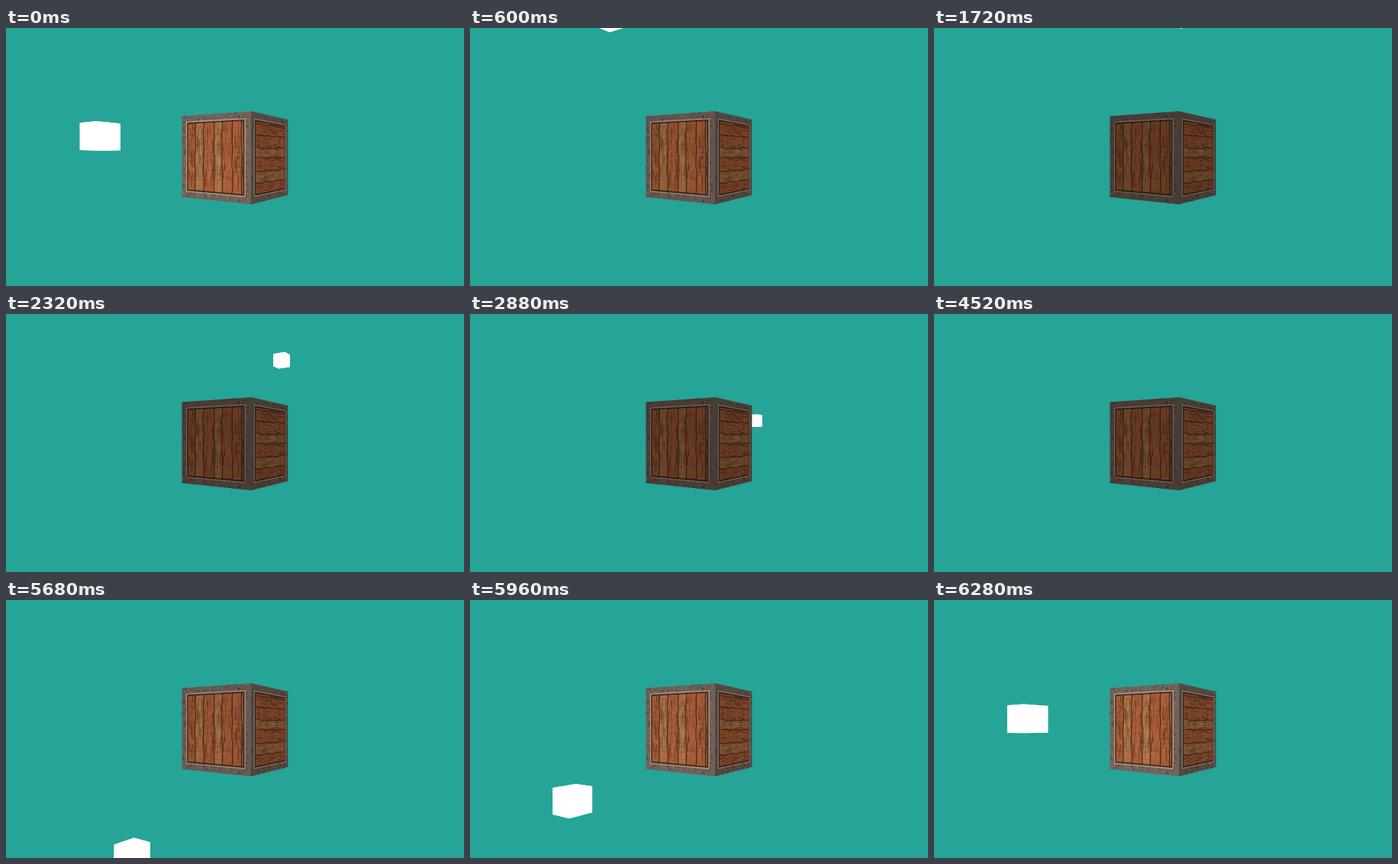
Write an HTML page with a canvas that moves like this. It is 600x338 px and loops after 6320 ms.

```html
<!DOCTYPE html>
<html lang="en">
<head>
<meta charset="utf-8">
<title>Lamp circling a crate</title>
<style>
  html, body { margin: 0; width: 100%; height: 100%; overflow: hidden; background: #26a498; }
  canvas { display: block; width: 600px; height: 338px; }
</style>
</head>
<body>
<canvas id="stage" width="600" height="338"></canvas>
<script>
const LOOP = 6320, STEP = 40, CX = 300, CY = 169;
const ctx = document.getElementById('stage').getContext('2d');

let seed = 7;
const rnd = () => (seed = (seed * 16807) % 2147483647) / 2147483647;
const range = (a, b) => a + (b - a) * rnd();
const mix = (a, b, k) => a + (b - a) * k;

function poly(c, points, color) {
  c.beginPath();
  points.forEach(p => c.lineTo(...p));
  c.closePath();
  c.fillStyle = color;
  c.fill();
}

// Perspective map of a unit square onto a wall with two upright edges [x, middle y, height].
const wall = (l, r) => (u, v) => {
  const zl = 1 / l[2], zr = 1 / r[2], z = mix(zl, zr, u);
  const x = mix(l[0] * zl, r[0] * zr, u) / z;
  return [x, mix(l[1], r[1], (x - l[0]) / (r[0] - l[0])) + (v - 0.5) / z];
};
const leftEdge = [230.5, 168.5, 106], nearEdge = [321, 170, 122], rightEdge = [369.3, 169.5, 99];
const front = wall(leftEdge, nearEdge), side = wall(nearEdge, rightEdge);
const outline = map => [map(0, 0), map(1, 0), map(1, 1), map(0, 1)];

// Planks run along b, side by side along a.
function paintWall(c, map) {
  seed = 7;
  const rect = (a0, b0, a1, b1, color) =>
    poly(c, [map(a0, b0), map(a1, b0), map(a1, b1), map(a0, b1)], color);
  const line = (points, color, width) => {
    c.beginPath();
    points.forEach(p => c.lineTo(...map(...p)));
    c.strokeStyle = color;
    c.lineWidth = width;
    c.stroke();
  };
  const frame = (m, color, width) =>
    line([[m, m], [1 - m, m], [1 - m, 1 - m], [m, 1 - m], [m, m]], color, width);

  // Worn frame: blotches, then fine scratches.
  rect(0, 0, 1, 1, '#72635a');
  for (let i = 0; i < 500; i++) {
    const a = range(0, 0.97), b = range(0, 0.97);
    rect(a, b, a + range(0.01, 0.03), b + range(0.01, 0.03),
      rnd() < 0.5 ? 'rgba(40,27,20,.32)' : 'rgba(170,150,134,.25)');
  }
  for (let i = 0; i < 420; i++) {
    const a = range(0, 0.95), b = range(0, 0.95), len = range(0.01, 0.05);
    line([[a, b], rnd() < 0.5 ? [a, b + len] : [a + len, b]],
      rnd() < 0.55 ? 'rgba(35,24,18,.45)' : 'rgba(175,155,138,.35)', 0.8);
  }

  const cuts = [0.085, 0.215, 0.345, 0.5, 0.614, 0.756, 0.88, 0.915];
  const woods = ['#a75d38', '#a87046', '#a65b36', '#aa7248', '#a85d38', '#a75e3a', '#a05a38'];
  woods.forEach((wood, i) => {
    const a0 = cuts[i], a1 = cuts[i + 1];
    rect(a0, 0.085, a1, 0.915, wood);
    for (let j = 0; j < 300 * (a1 - a0); j++) {
      const a = range(a0 + 0.01, a1 - 0.01), b = range(0.09, 0.74), len = range(0.04, 0.17);
      line([[a, b], [a + range(-0.008, 0.008), b + len / 2], [a, b + len]],
        rnd() < 0.6 ? 'rgba(55,22,8,.42)' : 'rgba(222,160,108,.4)', 0.7);
    }
    for (let j = 0; j < 14; j++) {
      const b = range(0.1, 0.9);
      line([[a0 + 0.01, b], [a1 - 0.01, b + range(-0.01, 0.01)]], 'rgba(65,25,10,.2)', 0.7);
    }
    if (i) {
      const gap = [];
      for (let b = 0.085; b < 0.92; b += 0.083) gap.push([a0 + range(-0.008, 0.008), b]);
      line(gap, 'rgba(40,17,8,.75)', 1.1);
    }
  });
  frame(0.093, '#3a241a', 1.4);
  frame(0.076, '#b5a494', 1.2);
}

const crate = document.createElement('canvas');
crate.width = 600;
crate.height = 338;
const cc = crate.getContext('2d');
paintWall(cc, front);
paintWall(cc, (a, b) => side(b, 1 - a));

// Lamp corners round its axis: sideways pixels and relative depth.
const corners = [[-14.5, -0.007], [3.1, -0.034], [14.5, 0.007], [-3.1, 0.034]];

function drawLamp(angle) {
  const k = -Math.cos(angle), far = Math.max(k, 0);
  const depth = 1 + 0.41 * k;
  const x = 6 + 110.6 * k - 13 * far * far, y = -204 * Math.sin(angle);
  const ring = dy => corners.map(([dx, dz]) =>
    [CX + (x + dx) / (depth + dz), CY + (y + dy) / (depth + dz)]);
  const top = ring(-10.5), bottom = ring(10.5);
  poly(ctx, top, '#fff');
  poly(ctx, bottom, '#fff');
  top.forEach((p, i) => {
    const j = (i + 1) % 4;
    poly(ctx, [p, top[j], bottom[j], bottom[i]], '#fff');
  });
}

function draw(ms) {
  const angle = 2 * Math.PI * ms / LOOP + 0.077;
  const ahead = Math.cos(angle) - 0.25;
  const light = Math.max(0, ahead / Math.hypot(ahead, Math.sin(angle)));
  ctx.fillStyle = '#26a498';
  ctx.fillRect(0, 0, 600, 338);
  drawLamp(angle);
  ctx.drawImage(crate, 0, 0);
  poly(ctx, outline(front), `rgba(14,8,6,${0.42 * (1 - light)})`);
  poly(ctx, outline(side), `rgba(14,8,6,${0.42 - 0.14 * light})`);
}

function tick() {
  draw(Math.floor(performance.now() % LOOP / STEP) * STEP);
  requestAnimationFrame(tick);
}
tick();
</script>
</body>
</html>
```
